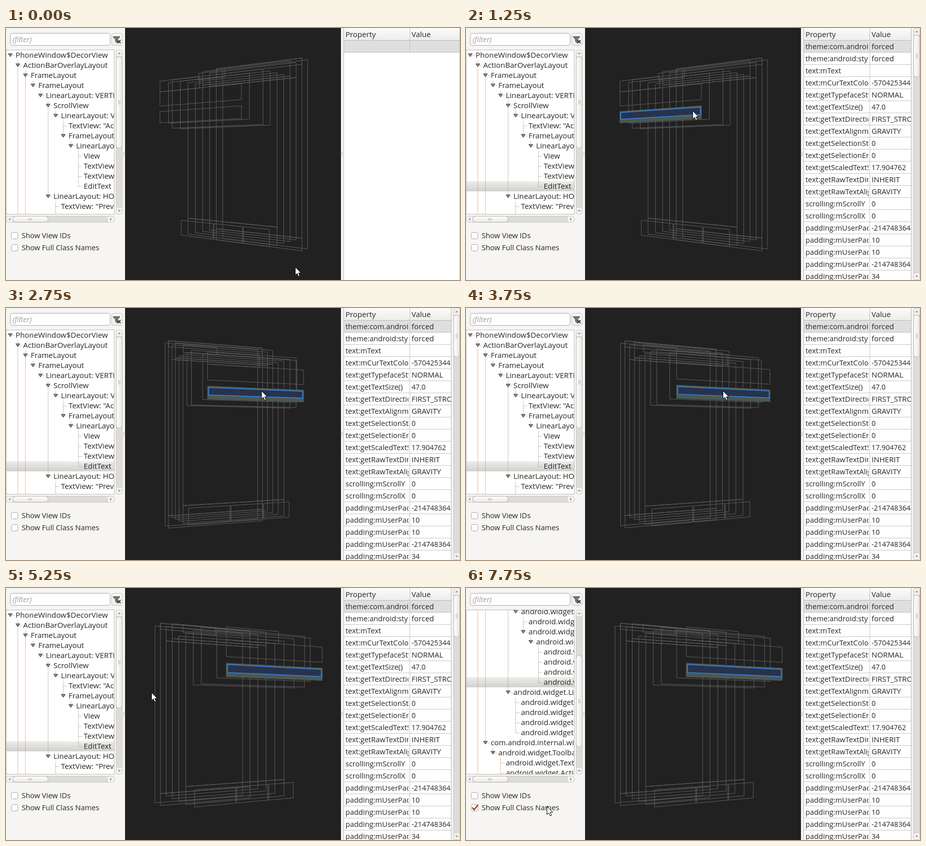
Write an HTML page that moves like this. It is 900 px wide and 500 px high and loops after 8000 ms.

```html
<!DOCTYPE html>
<html lang="en">
<head>
<meta charset="utf-8">
<title>View hierarchy inspector</title>
<style>
  html, body { margin: 0; width: 100%; height: 100%; overflow: hidden; background: #f6f5f3; }
  svg { display: block; }
  text { font: 14.9px "Open Sans", "Noto Sans", sans-serif; fill: #262626; white-space: pre; }
  text.name { font-size: 14.5px; }
  text.num { font-size: 14.1px; }
  text.label { font-size: 14.5px; }
  text.hint { font-style: italic; fill: #a0a0a0; font-size: 14.5px; }
  .branch { fill: none; stroke: #8f8f8f; stroke-dasharray: 1 1; }
  .warm { stroke: #e0703c; }
  #scene polygon { fill: none; stroke: #5d5d5d; }
  #scene .hover { fill: #28334d; stroke: none; }
  #scene .pad { fill: #4c5851; stroke: #4c5851; }
  #scene .inner { fill: #29324c; stroke: #2f87e2; stroke-width: 1.5; }
</style>
</head>
<body>
<script>
const LOOP = 8000, STEP = 250;

// One space of indent per level
const OUTLINE = `PhoneWindow$DecorView
 ActionBarOverlayLayout
  FrameLayout
   FrameLayout
    LinearLayout: VERTICAL
     ScrollView
      LinearLayout: VERTICAL
       TextView: "Account"
       FrameLayout
        LinearLayout: VERTICAL
         View
         TextView
         TextView
         EditText
     LinearLayout: HORIZONTAL
      TextView: "Previous"
      TextView: "Manual"
      Space
      TextView: "Next"
  ActionBarContainer
   Toolbar
    TextView
    ActionMenuView
 View
 View`;
const NODES = OUTLINE.split('\n').map(line => ({ depth: line.search(/\S/), label: line.trim() }));
const SELECTED = NODES.findIndex(n => n.label === 'EditText');

const PROPS = `theme:com.android.internal forced
theme:android:style forced
text:mText
text:mCurTextColor -570425344
text:getTypefaceStyle() NORMAL
text:getTextSize() 47.0
text:getTextDirection() FIRST_STRONG
text:getTextAlignment() GRAVITY
text:getSelectionStart() 0
text:getSelectionEnd() 0
text:getScaledTextSize() 17.904762
text:getRawTextDirection() INHERIT
text:getRawTextAlignment() GRAVITY
scrolling:mScrollY 0
scrolling:mScrollX 0
padding:mUserPaddingStart -2147483648
padding:mUserPaddingRight 10
padding:mUserPaddingLeft 10
padding:mUserPaddingEnd -2147483648
padding:mUserPaddingBottom 34`.split('\n').map(line => line.split(' '));

// Phone layout in device pixels; a view is [depth, left, top, right, bottom]
const W = 1080, H = 1920, STATUS = 63, TOP = 210, FORM = 697, FOOT = 1627, BOTTOM = 1794, MARGIN = 63;
const band = (depth, top, bottom) => [depth, 0, top, W, bottom];
const line = (top, bottom, right = W - MARGIN) => [9, MARGIN, top, right, bottom];
const GROUP = [8, MARGIN, 256, W - MARGIN, 655];
const FIELD = line(549, 657);
const FIELD_INNER = [9, FIELD[1] + 10, FIELD[2] + 10, FIELD[3] - 10, FIELD[4] - 34];
const BUTTONS = [13, 438, 787, 1083];
const VIEWS = [
  band(0, 0, H), band(1, 0, BOTTOM), band(1, 0, STATUS), band(1, BOTTOM, H),
  ...[2, 3, 4].map(d => band(d, TOP, BOTTOM)),
  ...[2, 3].map(d => band(d, STATUS, TOP)),
  [4, 42, 101, 388, 172],
  band(5, TOP, FOOT), band(5, FOOT, BOTTOM),
  ...[6, 7].map(d => band(d, TOP, FORM)),
  ...[0, 1, 2].map(i => [6, BUTTONS[i], FOOT + 8, BUTTONS[i + 1] - 11, BOTTOM - 6]),
  GROUP, line(257, 361, 558), line(361, 496), FIELD
];

// Pointer stops [time, x, y], joined by eased moves
const STOPS = [
  [250, 573, 474], [750, 478, 172], [1250, 449, 164], [1500, 449, 164], [3000, 509, 164], [4750, 509, 164],
  [5250, 288, 207], [5500, 226, 207], [5750, 226, 207], [6500, 226, 255], [7000, 226, 284], [7500, 160, 433]
];
const PICK_AT = 1250, FULL_AT = 7500;

const clamp = (v, lo, hi) => Math.min(hi, Math.max(lo, v));
const ease = p => p < .5 ? 2 * p * p : 1 - 2 * (1 - p) ** 2;

function pointer(t) {
  const i = clamp(STOPS.findIndex(s => s[0] > t), 1, STOPS.length - 1);
  const end = t >= STOPS[STOPS.length - 1][0] ? STOPS.length - 1 : i;
  const [t0, x0, y0] = STOPS[end - 1], [t1, x1, y1] = STOPS[end];
  const p = ease(clamp((t - t0) / (t1 - t0), 0, 1));
  return [x0 + (x1 - x0) * p, y0 + (y1 - y0) * p];
}

// Dragging turns the stack, the wheel spreads it, the thumb follows the pointer
const yawAt = t => 36 - 1.055 * (pointer(clamp(t, 1500, 3000))[0] - 449);
const gapAt = t => .0624 + .0306 * Math.sin(clamp((t - 3500) / 1250, 0, 1) * Math.PI / 2);
const thumbAt = t => pointer(clamp(t, 5500, 7000))[1] - 207;
const hoverAt = t => t < 750 || t >= PICK_AT ? null : t < 1000 ? GROUP : FIELD;

const rect = (x, y, w, h, fill, more = '') => `<rect x="${x}" y="${y}" width="${w}" height="${h}" fill="${fill}" ${more}/>`;
const box = (x, y, w, h, fill, stroke, r = 0) => rect(x + .5, y + .5, w - 1, h - 1, fill, `stroke="${stroke}" rx="${r}"`);
const text = (x, y, s, cls = '') => `<text x="${x}" y="${y}" class="${cls}">${s}</text>`;
const path = (d, more = '') => `<path d="${d}" ${more}/>`;
const pane = (x, y, w, h, body) => `<svg x="${x}" y="${y}" width="${w}" height="${h}" viewBox="${x} ${y} ${w} ${h}">${body}</svg>`;
const arrow = (x, y, turn) => path('M-3 1.5H3L0 -1.5Z', `fill="#888" transform="translate(${x} ${y}) rotate(${turn})"`);
const dots = (x, y) => [-4, -1, 2].map(d => rect(x, y + d, 3, 1, '#b9b6b1')).join('');
const fade = (id, a, b, x, y) => `<linearGradient id="${id}" x2="${x}" y2="${y}"><stop stop-color="${a}"/><stop offset="1" stop-color="${b}"/></linearGradient>`;

function fullName(label) {
  if (label.startsWith('PhoneWindow')) return 'com.android.internal.policy.' + label;
  if (/^ActionBar/.test(label)) return 'com.android.internal.widget.' + label;
  return (label === 'View' ? 'android.view.' : 'android.widget.') + label;
}

function vScroll(x, top, bottom, size, id) {
  const thumb = box(x, top + 13, 13, size, 'url(#thumbV)', '#b4b1ac', 6) +
    [-3, 0, 3].map(d => rect(x + 4, Math.floor(top + 13 + size / 2) + d, 5, 1, '#aaa7a2')).join('');
  return box(x, top, 13, bottom - top, '#f4f3f1', '#c9c6c2', 4) +
    rect(x + 1, top + 13, 11, bottom - top - 26, '#dedcd9') +
    arrow(x + 6.5, top + 7, 0) + arrow(x + 6.5, bottom - 7, 180) + `<g id="${id}">${thumb}</g>`;
}

function hScroll() {
  return box(0, 373, 215, 13, '#f4f3f1', '#c9c6c2', 4) + rect(13, 374, 189, 11, '#dedcd9') +
    arrow(7, 379.5, -90) + arrow(208, 379.5, 90) + box(13, 373, 71, 13, 'url(#thumbH)', '#b4b1ac', 6) +
    [44, 47, 50].map(x => rect(x, 377, 1, 5, '#aaa7a2')).join('');
}

function tree() {
  const rowY = i => 54 + 20 * i;
  const branch = (d, warm) => path(d, `class="branch ${warm ? 'warm' : ''}"`);
  let lines = '', marks = '', labels = '';
  NODES.forEach(({ depth, label }, i) => {
    const x = 8.5 + 15 * depth, y = rowY(i) + .5;
    const rest = NODES.slice(i + 1);
    const end = rest.findIndex(n => n.depth <= depth);
    const inside = (end < 0 ? rest : rest.slice(0, end)).map(n => n.depth);
    const isParent = inside.length > 0;
    lines += branch(`M${isParent ? x + 5 : x} ${y}H${x + 8}`, depth < 5);
    if (isParent) {
      const last = i + 1 + inside.lastIndexOf(depth + 1);
      lines += branch(`M${x + 15} ${y + 10}V${rowY(last)}`, depth < 4);
      marks += path(`M${x - 4} ${y - 3.5}H${x + 4}L${x} ${y + 2.5}Z`, 'fill="#8a8a8a" stroke="#3c3c3c"');
    }
    labels += text(19 + 15 * depth, rowY(i) + 5, label, 'node');
  });
  const row = `<g id="row">${rect(1, rowY(SELECTED) - 10, 213, 20, 'url(#picked)')}</g>`;
  return box(0, 43, 215, 327, '#fff', '#bdbab5') +
    pane(1, 44, 213, 325, `<g id="tree">${row}${lines}${marks}${labels}</g>`);
}

function controls() {
  const check = (y, s) => box(10, y, 14, 14, '#fff', '#a9a6a1', 3) + text(31, y + 12, s, 'label');
  return box(8, 10, 199, 25, '#fff', '#aaa7a2', 4) + text(13, 28, '(filter)', 'hint') +
    box(209, 10, 22, 25, 'url(#head)', '#c5c2bd', 4) +
    path('M212 17H226L221 23V30L217 27V23Z', 'fill="#777" stroke="#4a4a4a"') +
    path('M221 24L227 30M227 24L221 30', 'stroke="#333" stroke-width="2"') +
    check(405, 'Show View IDs') + check(429, 'Show Full Class Names') +
    path('M12.5 435.5L16 440L24 430', 'id="tick" fill="none" stroke="#93381f" stroke-width="2.4"');
}

function table() {
  const rows = PROPS.map(([name, value = ''], i) => {
    const y = 42 + 24 * i;
    return pane(669, y - 17, 129, 24, text(673, y, name, 'name')) +
      pane(801, y - 17, 81, 24, text(804, y, value, /\d/.test(value) ? 'num' : '')) +
      rect(670, y + 6, 213, 1, '#c6c6c6');
  }).join('');
  return rect(664, 0, 236, 500, '#f3f2f0') + dots(665, 251) + box(669, -1, 231, 502, '#fff', '#bdbab5') +
    rect(670, 0, 229, 24, 'url(#head)') + rect(670, 24, 229, 1, '#bdbab5') +
    rect(670, 25, 229, 23, '#dfdfdf') + rect(670, 48, 229, 1, '#c6c6c6') +
    text(673, 18, 'Property') + text(804, 18, 'Value') + rect(800, 0, 1, 49, '#c4c1bc') +
    `<g id="props">${rows}${rect(800, 25, 1, 475, '#c6c6c6')}${rect(882, 0, 1, 500, '#bdbab5')}` +
    `${rect(883, 0, 17, 500, '#f3f2f0')}${vScroll(887, 0, 500, 85, 'propThumb')}</g>`;
}

document.body.innerHTML = `<svg width="900" height="500" viewBox="0 0 900 500">
  <defs>${fade('thumbV', '#fff', '#e9e7e4', 1, 0)}${fade('thumbH', '#fff', '#e9e7e4', 0, 1)}
    ${fade('head', '#fcfbfa', '#eeedeb', 0, 1)}${fade('picked', '#eeedeb', '#d2d0cc', 0, 1)}</defs>
  ${rect(0, 0, 236, 500, '#f6f5f3')}${controls()}${tree()}
  ${vScroll(218, 43, 370, 183, 'treeThumb')}${hScroll()}${dots(232, 251)}
  ${rect(236, 0, 428, 500, '#212121')}
  <g id="scene"><polygon class="hover"/>${'<polygon class="view"/>'.repeat(VIEWS.length)}<polygon class="pad"/><polygon class="inner"/></g>
  ${table()}
  ${path('M0 0V16L3.7 12.6L6.2 18.6L8.9 17.4L6.4 11.6H11.4Z', 'id="cursor" fill="#fff" stroke="#000" stroke-linejoin="round"')}
</svg>`;

const $ = id => document.getElementById(id);
const shape = cls => document.querySelector('#scene .' + cls);
const hoverShape = shape('hover'), pad = shape('pad'), inner = shape('inner');
const viewShapes = document.querySelectorAll('#scene .view');
const labels = document.querySelectorAll('.node');
const show = (el, on) => el.setAttribute('visibility', on ? 'visible' : 'hidden');
const move = (el, x, y) => el.setAttribute('transform', `translate(${x} ${y})`);

// Corners of a view turned about the vertical axis, seen in perspective
function corners([depth, l, t, r, b], yaw, gap) {
  const a = yaw * Math.PI / 180, c = Math.cos(a), s = Math.sin(a), z = (depth - 4.5) * gap;
  return [[l, t], [r, t], [r, b], [l, b]].map(([px, py]) => {
    const x = (px - W / 2) / H, y = py / H - .5;
    const k = 984 / (2.56 - x * s - z * c);
    return `${(450.5 + k * (x * c - z * s)).toFixed(2)},${(250.8 + k * y).toFixed(2)}`;
  }).join(' ');
}

function draw(t) {
  const yaw = yawAt(t), gap = gapAt(t), thumb = Math.round(thumbAt(t));
  const [x, y] = pointer(t), hover = hoverAt(t);
  const place = (el, view) => el.setAttribute('points', corners(view, yaw, gap));

  VIEWS.forEach((view, i) => place(viewShapes[i], view));
  place(pad, FIELD);
  place(inner, FIELD_INNER);
  if (hover) place(hoverShape, hover);
  show(hoverShape, hover);
  for (const el of [pad, inner, $('row'), $('props')]) show(el, t >= PICK_AT);

  move($('tree'), 0, -Math.round(thumb * 1.65));
  move($('treeThumb'), 0, thumb);
  NODES.forEach(({ label }, i) => labels[i].textContent = t >= FULL_AT ? fullName(label) : label);
  show($('tick'), t >= FULL_AT);
  move($('cursor'), Math.round(x) + .5, Math.round(y) + .5);
}

const start = performance.now();
let shown = -1;
function tick() {
  const step = Math.floor((performance.now() - start) % LOOP / STEP);
  if (step !== shown) draw((shown = step) * STEP);
  requestAnimationFrame(tick);
}
tick();
</script>
</body>
</html>
```
